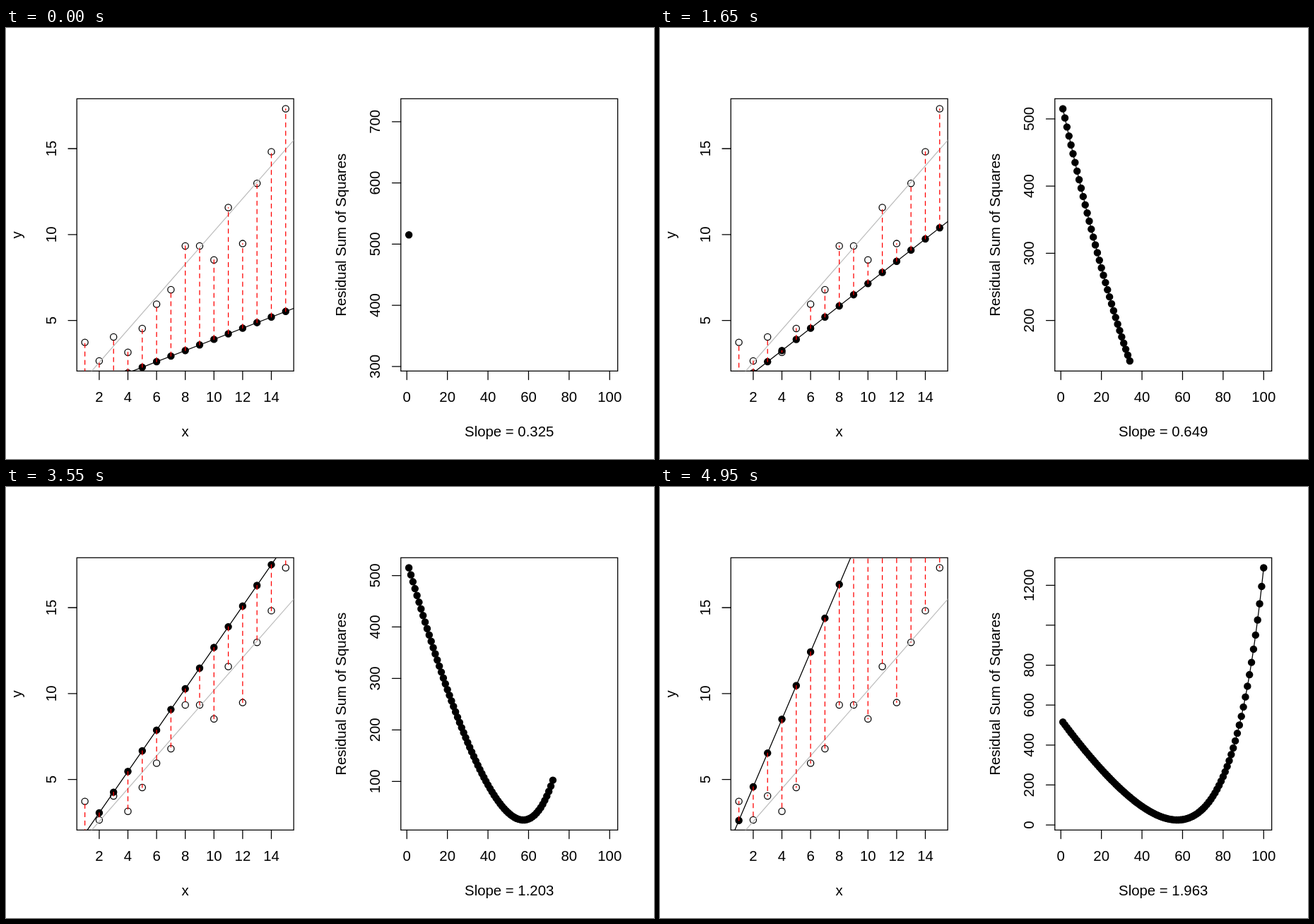
Write an HTML page that moves like this. It is 917 by 611 pixels and loops after 5000 ms.

```html
<!DOCTYPE html>
<html lang="en">
<head>
<meta charset="utf-8">
<title>Least squares</title>
<style>
html, body { margin: 0; width: 100%; height: 100%; overflow: hidden; background: #fff; }
svg { display: block; width: 917px; height: 611px; }
text { font-family: "Liberation Sans", Arial, Helvetica, sans-serif; text-anchor: middle; fill: #000; }
</style>
</head>
<body>
<svg id="stage" viewBox="0 0 917 611" xmlns="http://www.w3.org/2000/svg"></svg>
<script>
const W = 917, H = 611, STEPS = 100, STEP_MS = 50;
const FONT = W / 45, LINE = FONT * 1.2, LW = FONT / 16, R = FONT * 0.225;
const DASH = FONT * 3.5 / 12;
const DIGIT = FONT * 0.556, GAP = FONT * 0.833;

const ys = [3.727, 2.644, 4.04, 3.149, 4.532, 5.948, 6.79, 9.335, 9.335,
  8.526, 11.57, 9.475, 12.98, 14.82, 17.317];
const xs = ys.map((_, i) => i + 1);

// Ordinary fit: the intercept stays, the slope is swept by angle
const mean = a => a.reduce((s, v) => s + v, 0) / a.length;
const mx = mean(xs), my = mean(ys);
const fitB = xs.reduce((s, x, i) => s + (x - mx) * ys[i], 0) /
  xs.reduce((s, x) => s + (x - mx) ** 2, 0);
const fitA = my - fitB * mx;
const slopes = Array.from({ length: STEPS }, (_, i) =>
  Math.tan(Math.PI * (0.1 + 0.25 * i / (STEPS - 1))));
const rss = slopes.map(b => xs.reduce((s, x, i) => s + (ys[i] - fitA - b * x) ** 2, 0));

const stage = document.getElementById('stage');

function add(parent, tag, attrs, text) {
  const el = document.createElementNS('http://www.w3.org/2000/svg', tag);
  for (const k in attrs) el.setAttribute(k, attrs[k]);
  if (text !== undefined) el.textContent = text;
  parent.appendChild(el);
  return el;
}
function line(parent, x1, y1, x2, y2, stroke = '#000', more = {}) {
  return add(parent, 'line', { x1, y1, x2, y2, stroke, 'stroke-width': LW, 'stroke-linecap': 'round', ...more });
}
function dot(parent, cx, cy, fill) {
  return add(parent, 'circle', { cx, cy, r: R, fill, stroke: '#000', 'stroke-width': LW });
}
function label(parent, x, y, text, upright) {
  const attrs = { x, y, 'font-size': FONT };
  if (upright) attrs.transform = `rotate(-90 ${x} ${y})`;
  return add(parent, 'text', attrs, text);
}

function panel(left) {
  const p = { l: left + 4.1 * LINE, r: left + W / 2 - 2.1 * LINE, t: 4.1 * LINE, b: H - 5.1 * LINE };
  p.rect = { x: p.l, y: p.t, width: p.r - p.l, height: p.b - p.t };
  return p;
}
// Axis limits with 4% padding; a single value is widened first
function limits(lo, hi) {
  if (lo === hi) { lo *= 0.6; hi *= 1.4; }
  const pad = (hi - lo) * 0.04;
  return [lo - pad, hi + pad];
}
const scale = ([lo, hi], from, to) => v => from + (v - lo) / (hi - lo) * (to - from);

function ticks([lo, hi]) {
  const cell = (hi - lo) / 5, base = 10 ** Math.floor(Math.log10(cell));
  let unit = base;
  for (const [k, bias] of [[2, 0.8], [5, 1.7], [10, 0.8]]) {
    if (k * base - cell >= bias * (cell - unit)) break;
    unit = k * base;
  }
  const out = [];
  for (let i = Math.ceil(lo / unit); i * unit <= hi; i++) out.push(i * unit);
  return out;
}
function axis(parent, p, lim, pos, side) {
  let last = -Infinity;
  for (const v of ticks(lim)) {
    const q = pos(v), along = side === 'x' ? q : -q;
    const half = String(v).length * DIGIT / 2;
    const fits = along - half > last + GAP;
    if (fits) last = along + half;
    if (side === 'x') {
      line(parent, q, p.b, q, p.b + LINE / 2);
      if (fits) label(parent, q, p.b + 1.8 * LINE, v);
    } else {
      line(parent, p.l, q, p.l - LINE / 2, q);
      if (fits) label(parent, p.l - 1.2 * LINE, q, v, true);
    }
  }
}
function frame(p, xText, yText) {
  add(stage, 'rect', { ...p.rect, fill: 'none', stroke: '#000', 'stroke-width': LW });
  label(stage, p.l - 3.2 * LINE, (p.t + p.b) / 2, yText, true);
  return label(stage, (p.l + p.r) / 2, p.b + 3.8 * LINE, xText);
}

// Left panel: data, fitted line and residuals
const A = panel(0);
const xLim = limits(1, xs.length), yLim = limits(Math.min(...ys), Math.max(...ys));
const ax = scale(xLim, A.l, A.r), ay = scale(yLim, A.b, A.t);
frame(A, 'x', 'y');
axis(stage, A, xLim, ax, 'x');
axis(stage, A, yLim, ay, 'y');
add(add(add(stage, 'defs', {}), 'clipPath', { id: 'plot' }), 'rect', A.rect);
const inner = add(stage, 'g', { 'clip-path': 'url(#plot)' });
xs.forEach((x, i) => dot(inner, ax(x), ay(ys[i]), 'none'));
const lineY = (b, x) => ay(fitA + b * x);
line(inner, ax(0), lineY(fitB, 0), ax(16), lineY(fitB, 16), '#bebebe');
const trial = line(inner, ax(0), 0, ax(16), 0);
const guesses = xs.map(x => dot(inner, ax(x), 0, '#000'));
const residuals = xs.map((x, i) => line(inner, ax(x), 0, ax(x), ay(ys[i]), '#f00', { 'stroke-dasharray': DASH }));

// Right panel: sum of squares so far
const B = panel(W / 2);
const nLim = limits(1, STEPS), bx = scale(nLim, B.l, B.r);
const slopeText = frame(B, '', 'Residual Sum of Squares');
axis(stage, B, nLim, bx, 'x');
const scaleY = add(stage, 'g', {});
const curve = add(stage, 'polyline', { fill: 'none', stroke: '#000', 'stroke-width': LW, 'stroke-linejoin': 'round' });
const dots = rss.map((_, i) => dot(stage, bx(i + 1), 0, '#000'));

function draw(step) {
  const b = slopes[step];
  trial.setAttribute('y1', lineY(b, 0));
  trial.setAttribute('y2', lineY(b, 16));
  xs.forEach((x, i) => {
    guesses[i].setAttribute('cy', lineY(b, x));
    residuals[i].setAttribute('y1', lineY(b, x));
  });

  const seen = rss.slice(0, step + 1);
  const lim = limits(Math.min(...seen), Math.max(...seen));
  const by = scale(lim, B.b, B.t);
  scaleY.textContent = '';
  axis(scaleY, B, lim, by, 'y');
  curve.setAttribute('points', seen.map((v, i) => `${bx(i + 1)},${by(v)}`).join(' '));
  dots.forEach((d, i) => {
    d.setAttribute('visibility', i <= step ? 'visible' : 'hidden');
    if (i <= step) d.setAttribute('cy', by(rss[i]));
  });
  slopeText.textContent = 'Slope = ' + parseFloat(b.toFixed(3));
}

let shown = -1;
function tick(now) {
  const step = Math.floor(now / STEP_MS) % STEPS;
  if (step !== shown) draw(shown = step);
  requestAnimationFrame(tick);
}
draw(0);
requestAnimationFrame(tick);
</script>
</body>
</html>
```
